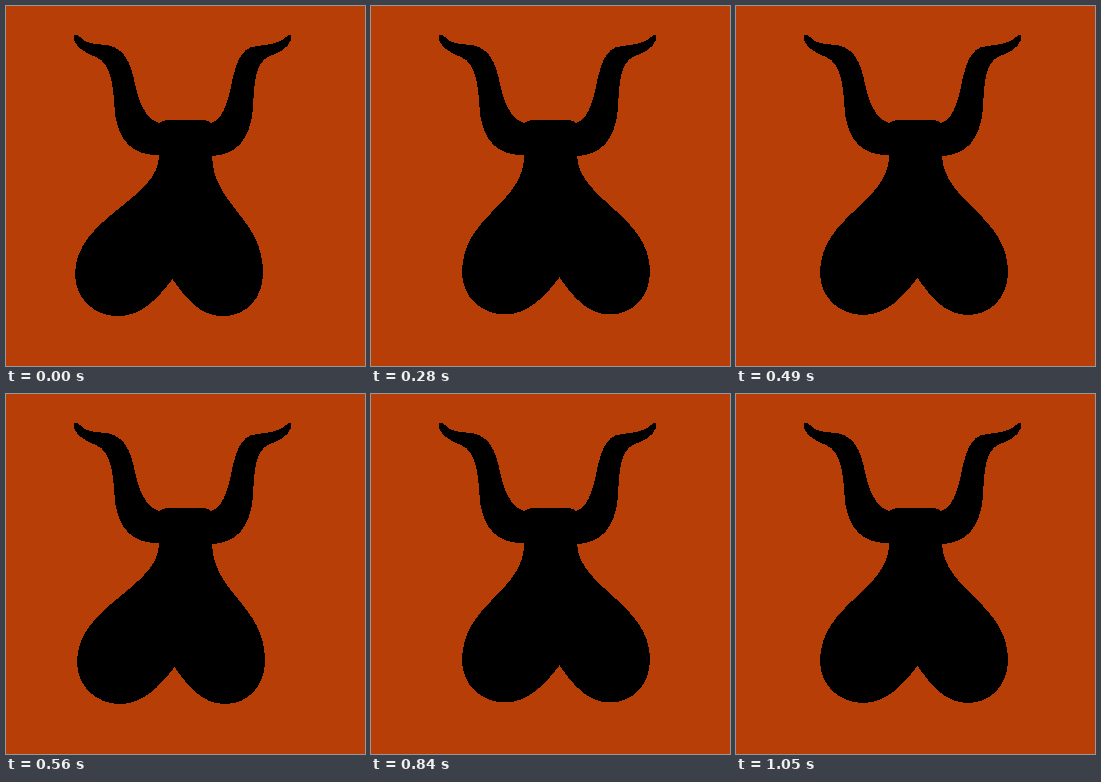
An HTML page that plays this animation: 359 by 360 pixels, repeating every 1.12 s.

```html
<!DOCTYPE html>
<html lang="en">
<head>
<meta charset="utf-8">
<title>Swinging horned figure</title>
<style>
html, body { margin: 0; width: 100%; height: 100%; overflow: hidden; background: #b83e08; }
svg { display: block; width: 100%; height: 100%; }
</style>
</head>
<body>
<svg viewBox="0 0 359 360" shape-rendering="crispEdges">
  <path d="M153 149C128 150 113 136 109 108C107 80 106 58 90 51C78 47 70 40 68 34
    C66 28 71 27 74 31C80 38 89 38 101 39C119 42 125 58 129 78C133 97 140 113 153 117
    Q157 114 163 114L196 114Q202 114 205 117C217 113 221 97 224 85C229 61 233 41 251 40
    C265 39 275 36 280 31C283 27 287 29 285 34C282 43 271 47 262 51C250 57 248 75 247 103
    C244 132 232 149 206 150L206 152L153 152Z"/>
  <path id="body"/>
</svg>
<script>
const STEP = 70;
// Sideways offset of the lobes: slow swing right, quick return, twice per loop.
const swing = [-15, -14, -10, -2, 7, 13, 15, 0, -13, -14, -10, -2, 7, 13, 15, 0];
const body = document.getElementById("body");

// The neck stays fixed; the lobes slide sideways and lift a little.
function bodyPath(d) {
  const p = (x, y) => `${x + d} ${y - d * 0.08} `;
  return "M206 149L153 149" +
    `C154 ${196 + d * 0.2} ` + p(84, 210) + p(84, 267) +
    "C" + p(84, 291) + p(103, 309) + p(127, 309) +
    "C" + p(150, 309) + p(166, 292) + p(181.5, 272) +
    "C" + p(195, 291) + p(209, 309) + p(232, 309) +
    "C" + p(255, 309) + p(272, 291) + p(272, 266) +
    "C" + p(272, 210) + `207 ${196 - d * 0.3} 206 149Z`;
}

function draw(now) {
  const step = Math.floor(now / STEP) % swing.length;
  body.setAttribute("d", bodyPath(swing[step]));
}

let start;
function tick(now) {
  start ??= now;
  draw(now - start);
  requestAnimationFrame(tick);
}
draw(0);
requestAnimationFrame(tick);
</script>
</body>
</html>
```
